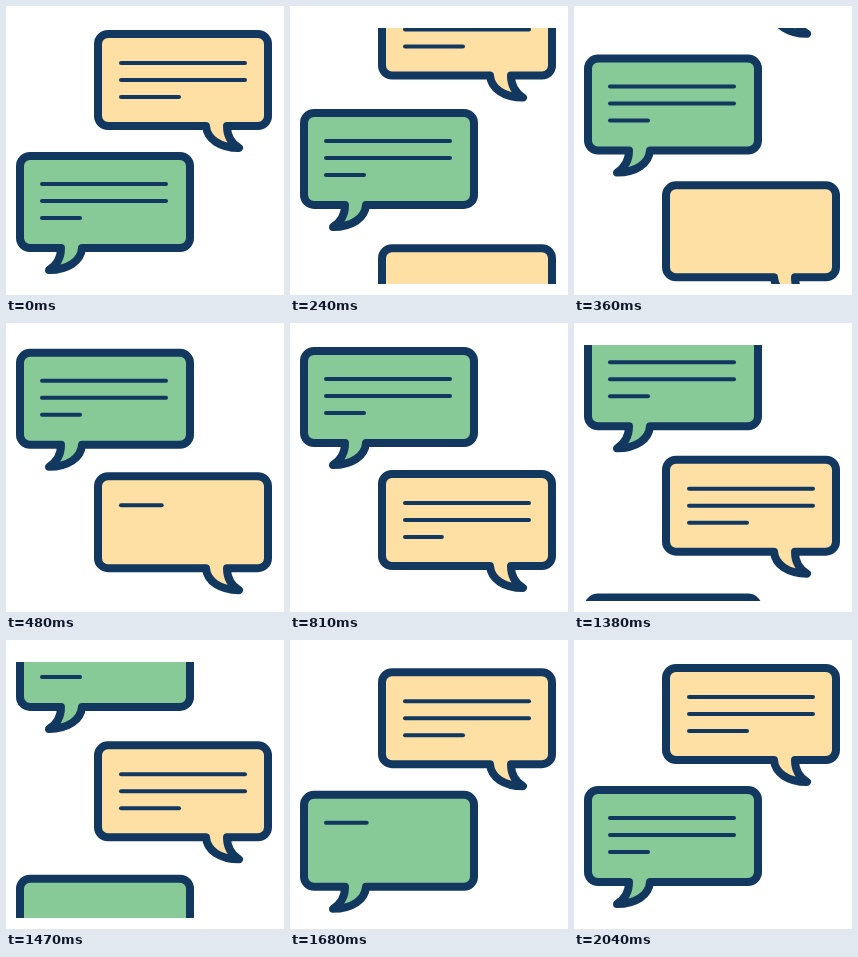
Animation, 278 px wide and 289 px high, one loop 2.43 s. Source, as an HTML page:

```html
<!DOCTYPE html>
<html lang="en">
<head>
<meta charset="utf-8">
<title>Chat bubbles</title>
<style>
  html, body { margin: 0; width: 100%; height: 100%; overflow: hidden; background: #fff; }
  svg { display: block; width: 100vw; height: 100vh; }
  .bubble { stroke: #12385f; stroke-width: 8; stroke-linecap: round; stroke-linejoin: round; }
  .bubble line { stroke-width: 4; }
</style>
</head>
<body>
<svg viewBox="0 0 278 289">
  <clipPath id="window"><rect x="10" y="22" width="256" height="256"/></clipPath>
  <g id="stage" clip-path="url(#window)"></g>
</svg>
<script>
const LOOP = 2430;
const SLIDE = 532;
const SPEED = 0.74; // writing speed, px per ms
const TOP = 28, GONE = -115, HIDDEN = 400;

// Outlines start at the top left corner of the body, y = 0.
const STYLES = {
  yellow: {
    fill: '#ffe0a4', low: 151, below: 292, textX: 115, textY: 29, widths: [124, 124, 58],
    d: 'M102 0H252A10 10 0 0 1 262 10V82A10 10 0 0 1 252 92H221' +
       'C221 101 225 109 233 114C214 114 201 105 200 92' +
       'H102A10 10 0 0 1 92 82V10A10 10 0 0 1 102 0Z'
  },
  green: {
    fill: '#87ca98', low: 150, below: 291, textX: 36, textY: 28, widths: [124, 124, 38],
    d: 'M24 0H174A10 10 0 0 1 184 10V82A10 10 0 0 1 174 92H76' +
       'C75 105 62 114 43 114C51 109 55 101 55 92' +
       'H24A10 10 0 0 1 14 82V10A10 10 0 0 1 24 0Z'
  }
};

// Each phase: one bubble leaves, one moves up, one enters and gets its text.
const PHASES = [
  { slide: 11, write: 426, old: 'yellow', next: 'green' },
  { slide: 1236, write: 1626, old: 'green', next: 'yellow' }
];

const stage = document.getElementById('stage');

function add(parent, tag, attrs) {
  const el = document.createElementNS('http://www.w3.org/2000/svg', tag);
  for (const key in attrs) el.setAttribute(key, attrs[key]);
  return parent.appendChild(el);
}

function makeBubble(style) {
  const group = add(stage, 'g', { class: 'bubble' });
  add(group, 'path', { d: style.d, fill: style.fill });
  const lines = style.widths.map((w, i) => {
    const y = style.textY + 17 * i;
    return add(group, 'line', { x1: style.textX, x2: style.textX + w, y1: y, y2: y });
  });
  return { style, group, lines };
}

const pairs = {};
for (const name in STYLES) {
  pairs[name] = [makeBubble(STYLES[name]), makeBubble(STYLES[name])];
}

function place(bubble, y, written = Infinity) {
  bubble.group.setAttribute('transform', `translate(0 ${y.toFixed(2)})`);
  bubble.lines.forEach((line, i) => {
    const full = bubble.style.widths[i];
    const len = Math.min(full, Math.max(0, written));
    line.setAttribute('x2', bubble.style.textX + len);
    line.style.display = len > 0 ? '' : 'none';
    written -= full;
  });
}

function ease(u) {
  u = Math.min(1, Math.max(0, u));
  return u < 0.5
    ? 0.5 * Math.pow(2 * u, 2.4)
    : 1 - 0.5 * Math.pow(2 - 2 * u, 2.4);
}

const mix = (a, b, p) => a + (b - a) * p;

function draw(t) {
  const phase = PHASES[t < 1220 ? 0 : 1];
  const p = ease((t - phase.slide) / SLIDE);
  const [leaving, entering] = pairs[phase.old];
  const [moving, unused] = pairs[phase.next];
  place(leaving, mix(TOP, GONE, p));
  place(moving, mix(moving.style.low, TOP, p));
  place(entering, mix(entering.style.below, entering.style.low, p), (t - phase.write) * SPEED);
  place(unused, HIDDEN);
}

const start = performance.now();
function tick() {
  draw((performance.now() - start) % LOOP);
  requestAnimationFrame(tick);
}
tick();
</script>
</body>
</html>
```
